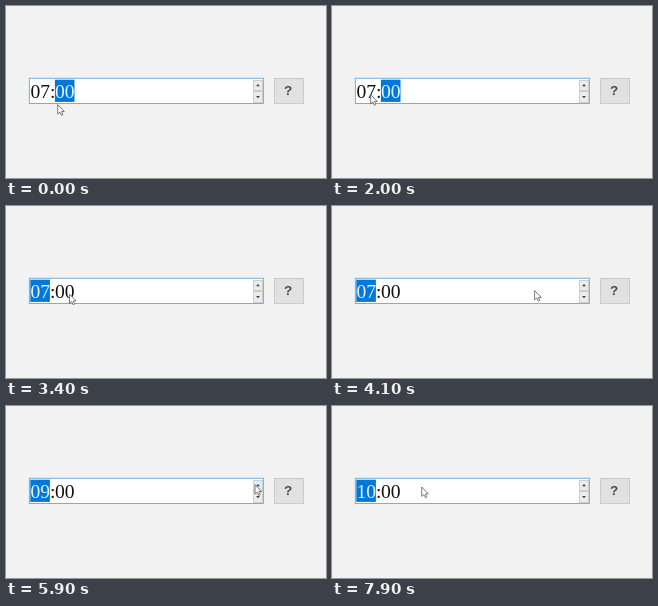
An HTML page for the animation above (8 s loop, 320 by 172 pixels).

```html
<!DOCTYPE html>
<html lang="en">
<head>
<meta charset="utf-8">
<title>Time field</title>
<style>
  html, body { margin: 0; width: 100%; height: 100%; overflow: hidden; background: #f2f2f2; }
  svg { display: block; width: 320px; height: 172px; }
  .time { font: 19.6px "Liberation Serif", "Times New Roman", serif; fill: #111; }
  .time .on { fill: #e4f2ff; }
  .help { font: bold 13.5px "Liberation Sans", Arial, sans-serif; fill: #484848; text-anchor: middle; }
  .spin rect { fill: #ececec; stroke: #cdcdcd; }
  .spin .hover { fill: #e1eef8; stroke: #bdd5e6; }
</style>
</head>
<body>
<svg viewBox="0 0 320 172">
  <rect x="23.4" y="72.3" width="234" height="25.2" fill="#fff" stroke="#70b1de"/>
  <rect id="mark" y="73.7" width="19.6" height="22.2" fill="#0078d7"/>
  <g class="time">
    <text id="hour" x="24.4" y="91.7">07</text>
    <text x="43.9" y="91.7">:</text>
    <text id="minute" x="49" y="91.7">00</text>
  </g>
  <g class="spin">
    <rect id="up" x="247.5" y="74.5" width="9" height="10"/>
    <rect x="247.5" y="85.5" width="9" height="11"/>
    <path d="M250 80.3L252 78L254 80.3ZM250 90L252 92.3L254 90Z" fill="#444"/>
  </g>
  <rect x="268.5" y="72.5" width="29" height="25" fill="#e1e1e1" stroke="#cacaca"/>
  <text class="help" x="282.2" y="89.4">?</text>
  <path id="pointer" d="M0 0V9.4L2.2 7.5L3.7 10.7L5.2 10L3.8 6.9H6.6Z" fill="#fff" stroke="#5a5a5a" stroke-width=".8" stroke-linejoin="round"/>
</svg>
<script>
const LOOP = 8000, STEP = 100;
const PICK_HOUR = 3100;
const HOME = { x: 51.7, y: 98.6 };
// each move eases to (x, y); sag bows its path downwards
const MOVES = [
  { from: 1000, to: 2700, x: 36, y: 86.5, sag: 0 },
  { from: 3300, to: 4800, x: 249, y: 78.7, sag: 6.5 },
  { from: 7200, to: 7900, x: 89.7, y: 81, sag: 0 }
];
const el = id => document.getElementById(id);
const [mark, hour, minute, up, pointer] = ["mark", "hour", "minute", "up", "pointer"].map(el);
const clamp = (v, lo, hi) => Math.min(hi, Math.max(lo, v));
const easeOut = k => 1 - (1 - k) ** 2;

function tipAt(t) {
  return MOVES.reduce((p, m) => {
    const k = easeOut(clamp((t - m.from) / (m.to - m.from), 0, 1));
    return {
      x: p.x + (m.x - p.x) * k,
      y: p.y + (m.y - p.y) * k + m.sag * Math.sin(Math.PI * k)
    };
  }, HOME);
}

// three clicks on the up button, half a second apart
const hourAt = t => 7 + clamp(Math.floor((t - 4900) / 500), 0, 3);

function draw(t) {
  const { x, y } = tipAt(t);
  const onHour = t >= PICK_HOUR;
  mark.setAttribute("x", onHour ? 24.3 : 48.9);
  hour.textContent = String(hourAt(t)).padStart(2, "0");
  hour.classList.toggle("on", onHour);
  minute.classList.toggle("on", !onHour);
  up.classList.toggle("hover", x >= 247 && y < 85);
  pointer.setAttribute("transform", `translate(${x} ${y})`);
}

const start = performance.now();
function tick() {
  const t = (performance.now() - start) % LOOP;
  draw(Math.floor(t / STEP) * STEP);
  requestAnimationFrame(tick);
}
draw(0);
requestAnimationFrame(tick);
</script>
</body>
</html>
```
